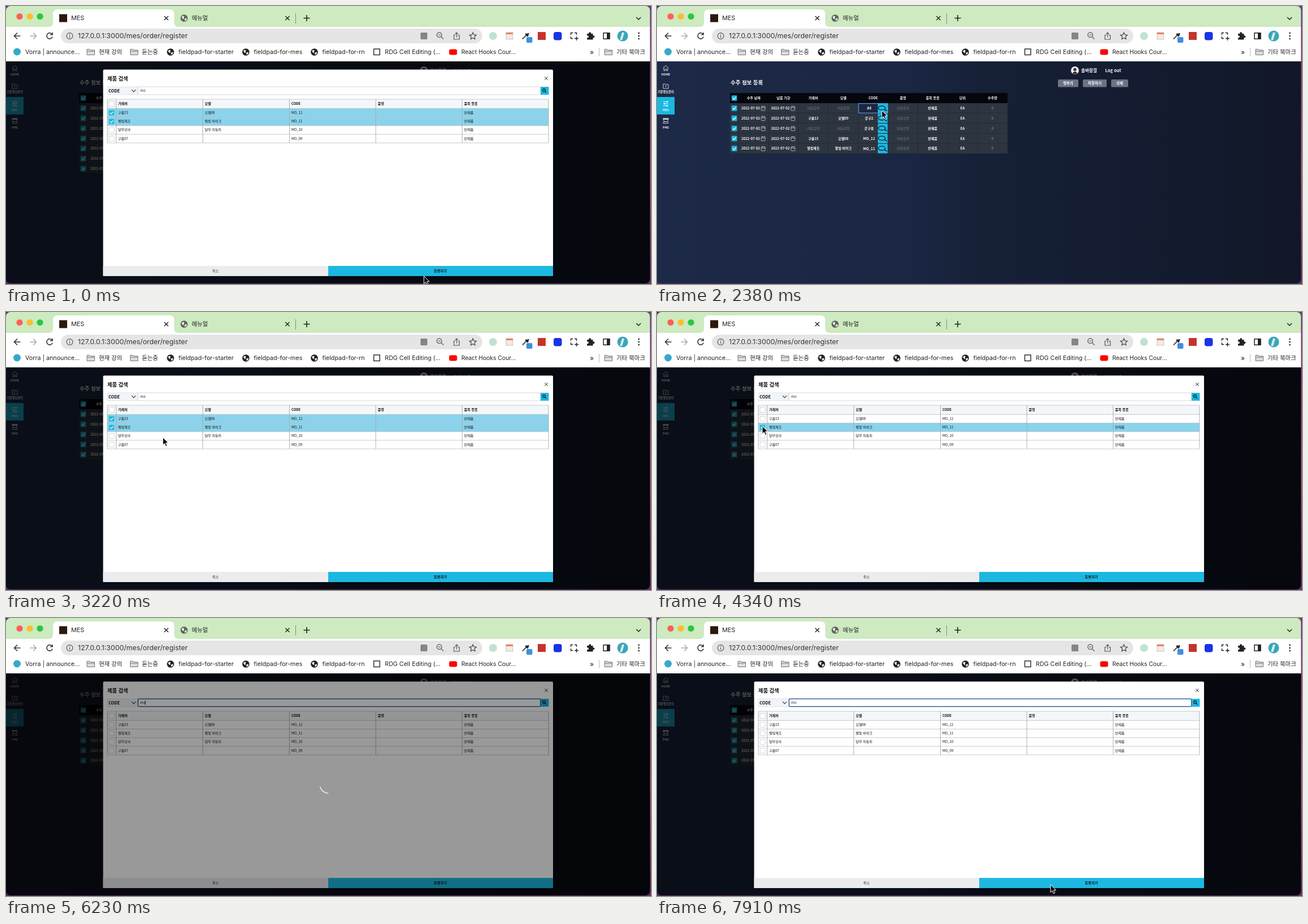
Write an HTML page that moves like this. It is 1139 px wide and 492 px high and loops after 8 s.

```html
<!DOCTYPE html>
<html lang="ko">
<head>
<meta charset="utf-8">
<style>
html, body { margin: 0; width: 100%; height: 100%; overflow: hidden; background: #54285a; }
svg { display: block; width: 1139px; height: 492px; }
text { font-family: Inter, "Noto Sans CJK KR", "Noto Sans CJK", sans-serif; white-space: pre; }
.app text { font-family: "Noto Sans CJK KR", "Noto Sans CJK", "Noto Sans", sans-serif; }
</style>
</head>
<body>
<svg id="stage" viewBox="0 0 1139 492"></svg>
<script>
const CYAN = '#1cb8e1';
const LOOP = 8000;

const rect = (x, y, w, h, fill, more = '') =>
  `<rect x="${x}" y="${y}" width="${w}" height="${h}" fill="${fill}" ${more}/>`;
const circle = (x, y, r, fill, more = '') =>
  `<circle cx="${x}" cy="${y}" r="${r}" fill="${fill}" ${more}/>`;
const line = (d, color, width = 1, more = '') =>
  `<path d="${d}" fill="none" stroke="${color}" stroke-width="${width}" ${more}/>`;
// y is the vertical middle of the text
const text = (x, y, s, size, fill = '#222', more = '') =>
  `<text x="${x}" y="${y + size * 0.36}" font-size="${size}" fill="${fill}" ${more}>${s}</text>`;
const MID = 'text-anchor="middle"';
const BOLD = 'font-weight="700"';
const MIDBOLD = MID + ' ' + BOLD;
const group = (id, body, more = '') => `<g id="${id}" ${more}>${body}</g>`;
const cross = (x, y, r, color, w) =>
  line(`M${x - r} ${y - r}l${2 * r} ${2 * r}m0 ${-2 * r}l${-2 * r} ${2 * r}`, color, w);
const chevron = (x, y, r, w) => line(`M${x - r} ${y - r / 2}l${r} ${r}l${r} ${-r}`, '#222', w);
const tick = (x, y, size) => rect(x - size / 2, y - size / 2, size, size, CYAN, 'rx="1"') +
  line(`M${x - 2.6} ${y}l2 2.2l3.4 -4`, '#fff', 1.2);
const lens = (x, y, r, color, w) =>
  circle(x - r * .2, y - r * .2, r, 'none', `stroke="${color}" stroke-width="${w}"`) +
  line(`M${x + r * .5} ${y + r * .5}l${r} ${r}`, color, w);
const globe = (x, y, color) => circle(x, y, 6.3, color) +
  `<path d="M${x - 4.5} ${y - 2}l3 -2l2 1.5l-1.5 1.5l1 2l-2 .5zM${x + 1} ${y + 1}l3.6 -1l-.5 3l-2.8 2z" fill="#fff"/>`;
const folder = (x, y) =>
  `<path d="M${x - 7} ${y - 5}h5l1.5 1.5h7v8.5h-13.5z" fill="#dcdcdc" stroke="#777"/>` +
  line(`M${x - 7} ${y - 1.5}h13.5`, '#777');

function browser() {
  const ink = '#333';
  let s = rect(0, 0, 1139, 37, '#cdeac0') + rect(0, 37, 1139, 61, '#fff');
  ['#ff5f57', '#febc2e', '#28c840'].forEach((c, i) => s += circle(24 + 18 * i, 18.5, 5.6, c));
  s += '<path d="M75 37q8 0 8 -8v-15q0 -8 8 -8h198q8 0 8 8v15q0 8 8 8z" fill="#fff"/>';
  s += rect(94, 14.5, 14, 14, '#2a1a0d') + text(115, 21.5, 'MES', 10.8);
  s += globe(314.5, 21.5, '#5c6658') + text(328, 21.5, '메뉴얼', 10.4);
  s += cross(283, 21.5, 3.6, '#222', 1.4) + cross(497, 21.5, 3.6, '#222', 1.4);
  s += line('M511.5 13v18', '#78916f') + line('M531 16v11M525.5 21.5h11', '#222', 1.6);
  s += chevron(1117, 22, 4, 1.5);

  // toolbar
  s += line('M25.5 53h-11m5.5 -5.5l-5.5 5.5l5.5 5.5', ink, 1.6);
  s += line('M42.5 53h11m-5.5 -5.5l5.5 5.5l-5.5 5.5', '#aaa', 1.5);
  s += line('M81.5 50a5.2 5.2 0 1 0 .6 4.5M82 47v3.8h-4', ink, 1.6);
  s += rect(97, 40, 744, 26, '#e6e5e5', 'rx="13"');
  s += circle(112.5, 53, 5.4, 'none', 'stroke="#555" stroke-width="1.2"') + line('M112.5 52.2v3.6M112.5 49.8v1.3', '#555', 1.3);
  s += text(127, 53, '127.0.0.1:3000/mes/order/register', 12.3, '#333');
  s += rect(732, 47, 12, 12, '#858585', 'rx="1.5"');
  s += lens(766, 52, 4.3, '#555', 1.3) + line('M763 51.2h4.4', '#555');
  s += line('M793.5 51.5h-2.5v7.5h9.5v-7.5h-2.5M795.7 55.5v-8.5m-2.6 2.6l2.6 -2.6l2.6 2.6', '#555', 1.2);
  s += line('M824.5 47l1.8 3.9l4.2 .5l-3.1 2.9l.8 4.2l-3.7 -2.1l-3.7 2.1l.8 -4.2l-3.1 -2.9l4.2 -.5z', '#444', 1.2);
  s += circle(860, 53, 7, '#bfe3cf');
  s += rect(883, 47, 12, 12, '#f6e9e2', 'stroke="#bbb" stroke-width=".8"') + rect(883, 47, 12, 3, '#e88363');
  s += line('M912 58.5l7 -7', '#555', 2.2) + line('M917.5 49l4.5 4.5M920 51.5l3 -3', '#222', 3);
  s += rect(919, 55, 10.5, 10, '#3e8fe5', 'rx="2"');
  s += rect(939, 46, 14, 14, '#c4342b') + rect(967, 46, 14.5, 14.5, '#1735e5', 'rx="4"');
  s += line('M997.5 51v-3.5h3.5M1004 47.5h3.5v3.5M997.5 54v3.5h3.5M1004 57.5h7M1007.5 54v7', '#222', 1.4);
  s += `<path d="M1026 49h3.3a2 2 0 1 1 3.6 0h3.6v3.4a2 2 0 1 1 0 3.6v3.5h-10.5v-3.5a2 2 0 1 0 0 -3.6z" fill="#222"/>`;
  s += rect(1055, 47.7, 11, 10.5, 'none', 'stroke="#222" stroke-width="1.5"') + rect(1061, 48, 5, 10, '#222');
  s += circle(1089, 53, 9.5, '#3aa6b9') + line('M1086 60l4 -13', '#d8eef0', 4);
  [-5, 0, 5].forEach(d => s += circle(1117.5, 53 + d, 1.4, '#333'));

  // bookmarks
  const mark = (x, label, size = 10.7) => text(x, 81.5, label, size);
  s += circle(19.5, 81, 6.5, '#36a9c9') + mark(34, 'Vorra | announce...');
  s += folder(150, 81.5) + mark(164, '현재 강의', 10.4) + folder(226.5, 81.5) + mark(240, '듣는중', 10.4);
  [[290.5, 'starter'], [423.5, 'mes'], [544.5, 'rn']].forEach(([x, name]) =>
    s += globe(x, 81.5, '#222') + mark(x + 14, 'fieldpad-for-' + name));
  s += rect(649.5, 76, 10.5, 10.5, '#fff', 'stroke="#222" stroke-width="1.4"') + mark(669, 'RDG Cell Editing (...');
  s += rect(782.5, 76.5, 14, 10, '#f00', 'rx="3"') + mark(804, 'React Hooks Cour...', 10.3);
  s += mark(1031, '»', 12) + line('M1047.5 74v15', '#bbb') + folder(1064, 81.5) + mark(1078, '기타 북마크', 10.4);
  return s;
}

function sidebar() {
  const label = (y, s) => text(15.5, y, s, 5.2, '#fff', MIDBOLD);
  return rect(0, 161, 31, 31, CYAN) +
    line('M11 109.5l4.5 -4l4.5 4M12 109v5.5h2.3v-3h2.4v3h2.3v-5.5', '#ddd', .9) + label(121, 'HOME') +
    line('M11 138h3.5l1 1h4.5v7h-9zM15.5 140v4', '#ddd', .9) + label(152.5, '기준정보관리') +
    line('M11 169.5h9M11 173h9M11 176.5h9', '#fff', .9) +
    circle(17.5, 169.5, 1.2, '#fff') + circle(13.5, 173, 1.2, '#fff') + circle(17.5, 176.5, 1.2, '#fff') + label(184, 'MES') +
    rect(10.5, 198.5, 10, 2.5, '#ddd') + line('M12 201v3.5h7v-3.5M11 207.5l1.5 -3h6l1.5 3z', '#ddd', .9) + label(215.5, 'PMS');
}

const COLS = [129, 144.5, 197, 249.5, 302.5, 355.5, 408, 460.5, 513, 566, 619];
const ROW_H = 17.85;
const AUTO = '자동입력';

function orderRow(i, [client, model, code, kind = '반제품']) {
  const top = 172 + i * ROW_H, y = top + ROW_H / 2;
  const cell = (c, s) => text((COLS[c] + COLS[c + 1]) / 2, y, s, 6,
    s === AUTO || s === '0' ? '#737b88' : '#fff', s === AUTO ? MID : MIDBOLD);
  let s = rect(129, top, 490, ROW_H, '#2d3541');
  COLS.slice(1, -1).forEach(x => s += line(`M${x} ${top}v${ROW_H}`, '#222936', .8));
  s += line(`M129 ${top + ROW_H}h490`, '#1d2430', .8) + tick(136.5, y, 9.5);
  [149, 201.5].forEach(x => s += text(x, y, '2022-07-02', 6, '#fff', BOLD) +
    rect(x + 35, y - 3, 7, 7, 'none', 'stroke="#ccc" stroke-width=".8" rx="1"') +
    line(`M${x + 35} ${y - .8}h7M${x + 37} ${y - 4.2}v2M${x + 40} ${y - 4.2}v2`, '#ccc', .8));
  s += cell(3, client) + cell(4, model);
  if (i === 0) s += group('cellFocus', rect(356, 172.6, 51.5, 16.8, '#1c2740', 'stroke="#5b9bea" stroke-width="1.2"'));
  s += text(374.5, y, code, 6.2, '#fff', MIDBOLD);
  s += rect(390, top + .5, 17.3, ROW_H - 1, CYAN);
  s += `<ellipse cx="397" cy="${y - .5}" rx="6" ry="3.6" fill="none" stroke="#0c1b26" stroke-width="1.3"/>` +
    line(`M401.5 ${y + 1.6}l4.5 3.2`, '#0c1b26', 1.5);
  return s + cell(6, AUTO) + cell(7, kind) + cell(8, 'EA') + cell(9, '0');
}

function orderPage() {
  let s = rect(0, 98, 1139, 394, 'url(#night)') + sidebar();
  s += text(130, 135.5, '수주 정보 등록', 9.4, '#fff', BOLD);
  s += circle(738, 114, 7, '#eee') + circle(738, 112.5, 2.7, '#333') + '<path d="M733.5 119q4.5 -6 9 0q-4.5 3.5 -9 0z" fill="#333"/>';
  s += text(749, 114, '솔바람결', 7.6, '#fff', BOLD) + text(791.5, 114, 'Log out', 7.5, '#fff', BOLD);
  [[708, 36, '행추가'], [752, 42, '저장하기'], [802, 30, '삭제']].forEach(([x, w, label]) =>
    s += rect(x, 130, w, 13.5, '#6b7485', 'rx="1.5"') + text(x + w / 2, 136.5, label, 6.6, '#fff', MIDBOLD));
  s += rect(129, 154, 490, 18, '#05070c') + tick(136.5, 163, 9.5);
  ['수주 날짜', '납품 기한', '거래처', '모델', 'CODE', '품명', '품목 종류', '단위', '수주량'].forEach((h, i) =>
    s += text((COLS[i + 1] + COLS[i + 2]) / 2, 163, h, 6.1, '#fff', MIDBOLD));
  const added = [['구름15', '모델08', 'MO_12'], ['별빛제조', '별빛 바이크', 'MO_11']];
  const rows = [[AUTO, AUTO, 'dd'], ['구름13', '모델09', '공구2', '완제품'], [AUTO, AUTO, '공구용', '완제품'], ...added];
  s += rows.map((r, i) => orderRow(i, r)).join('');
  return s + group('extraRows', added.map((r, i) => orderRow(i + 5, r)).join(''));
}

function modal() {
  const cols = [179, 194.5, 347.5, 500.5, 653, 805.5, 958], rowH = 15.25;
  let s = rect(0, 98, 1139, 394, '#000', 'opacity=".66"') + rect(171.5, 112.5, 794.5, 365.5, '#fff', 'rx="2"');
  s += text(179, 128.5, '제품 검색', 9.2, '#111', BOLD) + cross(954, 128, 2.9, '#333', 1);
  s += rect(179, 143, 53.5, 14, '#f1f4f8', 'stroke="#d5d9de" stroke-width=".7"') +
    text(181, 150, 'CODE', 7.4, '#111', BOLD) + chevron(225.5, 150, 3.6, 1.1);
  s += rect(233, 143, 711, 14, '#fff', 'stroke="#ccc" stroke-width=".8"');
  s += group('inputFocus', rect(233.2, 143.2, 710.5, 13.4, 'none', 'stroke="#1d559c" stroke-width="1.3" rx="1.5"'));
  s += text(237, 150, 'mo', 6.2, '#222') + rect(944, 143, 14.5, 14, CYAN) + lens(950.5, 149.5, 2.4, '#111', 1.1);
  s += group('caret', rect(245.4, 146.5, .9, 7, '#000'));
  s += rect(179, 165, 779, 16.5, '#f4f7fa');
  ['거래처', '모델', 'CODE', '품명', '품목 종류'].forEach((h, i) => s += text(cols[i + 1] + 3.5, 173.2, h, 6, '#111', BOLD));
  const box = y => rect(182, y - 4.5, 9, 9, '#fff', 'stroke="#c4c8cc" stroke-width=".8" rx="1"');
  s += box(173.2);
  [['구름15', '모델08', 'MO_12'], ['별빛제조', '별빛 바이크', 'MO_11'], ['달무상사', '달무 자동차', 'MO_10'], ['구름07', '-', 'MO_09']]
    .forEach((cells, r) => {
      const top = 181.3 + r * rowH, y = top + rowH / 2;
      s += box(y);
      if (r < 2) s += group('picked' + r, rect(179, top, 779, rowH, '#8ad3ec') + tick(186.5, y, 9));
      [...cells, '-', '반제품'].forEach((c, i) => s += text(cols[i + 1] + 3.5, y - .2, c, 6, c === '-' ? '#999' : '#111', 'font-weight="500"'));
    });
  for (let r = 0; r < 5; r++) s += line(`M179 ${181.3 + r * rowH}h779`, '#b9bdc1', .8);
  s += line('M179 165h779', '#b9bdc1', .8);
  cols.forEach(x => s += line(`M${x} 165v77.3`, '#a5a9ad', .9));
  s += rect(171.5, 460, 397.5, 18, '#ebeced') + rect(569, 460, 397, 18, CYAN);
  return s + text(370, 468.8, '취소', 6.2, '#333', MID) + text(767, 468.8, '등록하기', 6.2, '#111', MIDBOLD);
}

const stage = document.getElementById('stage');
stage.innerHTML = `<defs>
  <linearGradient id="night"><stop stop-color="#1d2a47"/><stop offset=".4" stop-color="#1a2642"/><stop offset=".5" stop-color="#162037"/><stop offset=".85" stop-color="#121a2d"/><stop offset="1" stop-color="#111727"/></linearGradient>
  <linearGradient id="desktop" x2="0" y2="1"><stop stop-color="#6b3a78"/><stop offset=".6" stop-color="#b0587f"/><stop offset="1" stop-color="#6a3060"/></linearGradient>
  <clipPath id="frame"><rect width="1137.2" height="490.8" rx="8"/></clipPath></defs>` +
  rect(0, 0, 1139, 492, '#54285a') + rect(1130, 0, 9, 492, 'url(#desktop)') +
  group('window', browser() + group('page', orderPage() + group('modal', modal()) +
    group('loader', rect(0, 98, 1139, 394, '#000', 'opacity=".4"') +
      group('spinner', line('M0 15.5A15.5 15.5 0 0 1 -15 4', '#fff', 1.2))), 'class="app"'),
    'clip-path="url(#frame)"') +
  group('arrow', '<path d="M0 0v13.5l3.1 -2.9l2.2 5l2.3 -1l-2.2 -4.9h4.3z" fill="#000" stroke="#fff" stroke-width="1"/>') +
  group('ibeam', line('M-3 -6.5q3 0 3 2v9q0 2 -3 2M3 -6.5q-3 0 -3 2v9q0 2 3 2', '#111', 1.2));

const el = id => document.getElementById(id);
const show = (id, on) => el(id).style.display = on ? '' : 'none';
const within = (t, a, b) => t >= a && t < b;

// pointer stops: time, x, y
const POINTER = [
  [140, 738, 478], [770, 610, 385], [1050, 610, 385], [1330, 475, 288], [1610, 475, 288],
  [2310, 397, 185], [2450, 397, 185], [2730, 385, 197], [3220, 277, 222], [3290, 277, 222],
  [3780, 192, 194], [3920, 192, 194], [3990, 186, 187], [4200, 186, 187], [4340, 186, 202],
  [4480, 186, 202], [4550, 262, 190], [4830, 262, 190], [5040, 261, 157], [6650, 261, 157],
  [6790, 590, 398], [7070, 590, 398], [7280, 682, 477], [7490, 682, 477], [7910, 695, 472]
];

function pointerAt(t) {
  const next = POINTER.findIndex(p => p[0] > t);
  if (next === 0) return POINTER[0].slice(1);
  if (next < 0) return POINTER.at(-1).slice(1);
  const [t0, x0, y0] = POINTER[next - 1], [t1, x1, y1] = POINTER[next];
  const k = (t - t0) / (t1 - t0), e = k * k * (3 - 2 * k);
  return [x0 + (x1 - x0) * e, y0 + (y1 - y0) * e];
}

function draw(now) {
  const t = now % LOOP;
  show('extraRows', t < 140);
  show('modal', t < 140 || t >= 2450);
  show('cellFocus', within(t, 2240, 5000));
  show('loader', within(t, 2520, 3150) || within(t, 5880, 6510));
  el('spinner').setAttribute('transform', `translate(569.5 294.5) rotate(${(t - 2730) / 700 * 360})`);
  show('picked0', t < 4200);
  show('picked1', t < 4480);
  show('inputFocus', t >= 5180);
  show('caret', t >= 5180 && Math.floor((t - 5180) / 490) % 2 === 0);
  const [x, y] = pointerAt(t);
  const typing = within(t, 5810, 6720), overInput = within(t, 5000, 5810);
  show('arrow', !typing && !overInput);
  show('ibeam', overInput);
  ['arrow', 'ibeam'].forEach(id => el(id).setAttribute('transform', `translate(${x} ${y})`));
  requestAnimationFrame(() => draw(performance.now()));
}
draw(0);
</script>
</body>
</html>
```
